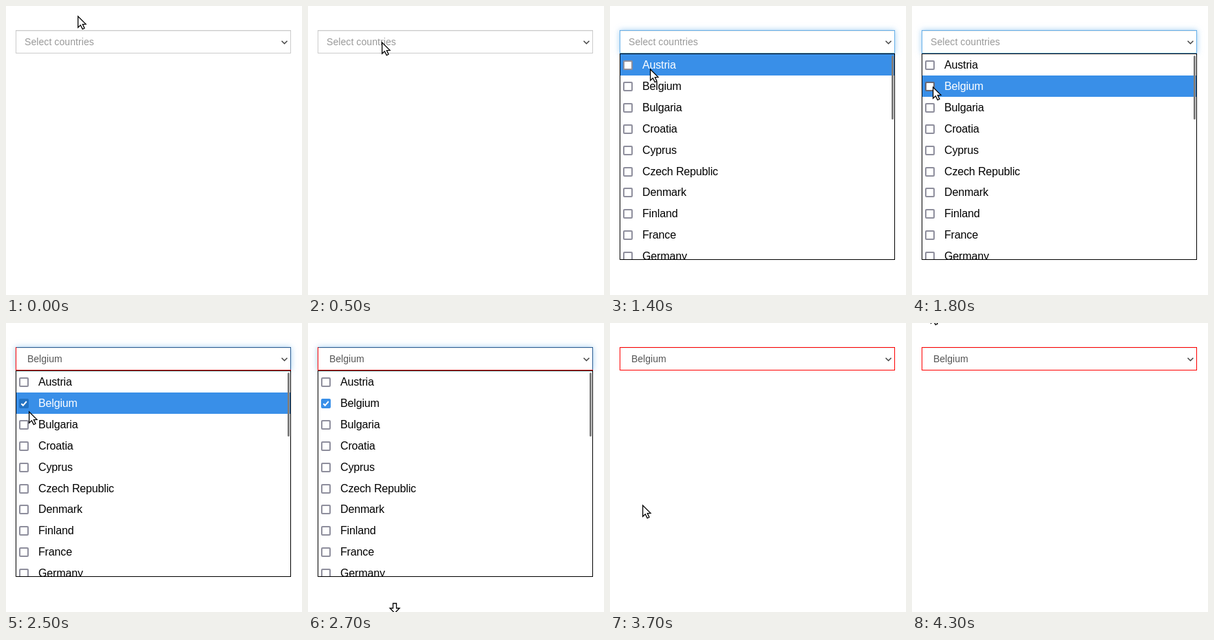
These frames come from a looping animation (430 px wide and 420 px high, 4700 ms). An HTML page with a canvas:

```html
<!DOCTYPE html>
<html lang="en">
<head>
<meta charset="utf-8">
<title>Country picker</title>
<style>
  html, body { margin: 0; width: 100%; height: 100%; overflow: hidden; background: #fff; }
  canvas { display: block; }
</style>
</head>
<body>
<canvas id="stage" width="430" height="420"></canvas>
<script>
const LOOP = 4700, STEP = 100;
const OPEN = 700, PICKED = 2000, LEAVE = 2700, CLOSE = 3100, BLUR = 3300;
const FONT = '"Liberation Sans", Arial, sans-serif';
const BLUE = '#398fe8', FOCUS = '#66afe9', RED = '#f00';
const LIST_TOP = 70.45, ROW = 30.82;

const countries = ['Austria', 'Belgium', 'Bulgaria', 'Croatia', 'Cyprus',
  'Czech Republic', 'Denmark', 'Finland', 'France', 'Germany'];
const PICK = countries.indexOf('Belgium');

const ctx = document.getElementById('stage').getContext('2d');

// Each move starts at a time and reaches its end after some steps;
// power 1 is linear, 3 accelerates.
const home = { x: 104, y: 14 };
const moves = [
  { at: 200, steps: 4, x: 107, y: 52 },
  { at: 1100, steps: 6, x: 34, y: 110 },
  { at: 1700, steps: 2, x: 30, y: 117 },
  { at: 2500, steps: 3, x: 118, y: 406, power: 3 },
  { at: 3000, steps: 1, x: 119, y: 395 },
  { at: 3600, steps: 3, x: -124, y: -47, power: 3 },
  { at: 4200, steps: 1, x: 27, y: -17 }
];

function pointerAt(t) {
  let { x, y } = home;
  for (const m of moves) {
    if (t < m.at) break;
    const p = Math.min(1, ((t - m.at) / STEP + 1) / m.steps) ** (m.power || 1);
    x += (m.x - x) * p;
    y += (m.y - y) * p;
  }
  return { x: Math.round(x), y: Math.round(y) };
}

function rect(x, y, w, h, color) {
  ctx.fillStyle = color;
  ctx.fillRect(x, y, w, h);
}

function roundBox(x, y, w, h, r, color) {
  ctx.beginPath();
  ctx.roundRect(x, y, w, h, r);
  ctx.fillStyle = color;
  ctx.fill();
}

function text(str, x, y, size, spacing, color) {
  ctx.font = `${size}px ${FONT}`;
  ctx.letterSpacing = `${spacing}px`;
  ctx.fillStyle = color;
  ctx.fillText(str, x, y);
}

function stroke(shape, color, width) {
  ctx.strokeStyle = color;
  ctx.lineWidth = width;
  ctx.stroke(shape);
}

function glowAt(t) {
  if (t < OPEN || t >= BLUR) return 0;
  if (t === OPEN) return 0.5;
  return t < BLUR - STEP ? 1 : 0.35;
}

// Colours of the top and right, then the left and bottom edges
function borderAt(t) {
  if (t < OPEN) return ['#ccc', '#ccc'];
  if (t <= PICKED) return [FOCUS, FOCUS];
  return t < BLUR ? ['#2b5d94', RED] : [RED, RED];
}

const chevron = new Path2D('M400.5 50.7l4 4 4-4');

function drawField(t) {
  ctx.save();
  ctx.shadowBlur = 8;
  ctx.shadowColor = `rgba(102,175,233,${0.6 * glowAt(t)})`;
  rect(14, 35, 400, 34, '#fff');
  ctx.restore();
  rect(15, 36, 398, 1, 'rgba(0,0,0,0.075)');

  const [upper, lower] = borderAt(t);
  rect(14, 35, 400, 1, upper);
  rect(413, 35, 1, 34, upper);
  rect(14, 35, 1, 34, lower);
  rect(14, 68, 400, 1, lower);

  if (t < PICKED) text('Select countries', 27, 57, 14, 0.08, '#999');
  else text(countries[PICK], 31, 57, 14, 0, '#555');
  stroke(chevron, '#444', 1.5);
}

const tick = new Path2D('M22.3 .2l2.5 2.6 5-5.8');

function drawCheck(y, checked, hover) {
  if (checked) {
    roundBox(19, y - 7, 14, 14, 2, hover ? '#2272c3' : BLUE);
    ctx.save();
    ctx.translate(0, y);
    stroke(tick, '#fff', 2);
    ctx.restore();
  } else {
    roundBox(19, y - 7, 14, 14, 2, hover ? '#676774' : '#8f8f9d');
    roundBox(21, y - 5, 10, 10, 0.5, '#fff');
  }
}

function drawList(t, pointer) {
  const active = t < LEAVE ? Math.max(0, Math.floor((pointer.y - LIST_TOP) / ROW)) : -1;
  rect(14, 69, 400, 300, '#000');
  rect(15, 70, 398, 298, '#fff');
  ctx.save();
  ctx.beginPath();
  ctx.rect(15, 70, 398, 298);
  ctx.clip();
  countries.forEach((name, i) => {
    const top = Math.round(LIST_TOP + i * ROW);
    const on = i === active;
    if (on) rect(15, top, 398, 31, BLUE);
    drawCheck(top + 16, i === PICK && t >= PICKED, on && pointer.x <= 33);
    text(name, 47, top + 21, 16, -0.15, on ? '#fff' : '#000');
  });
  roundBox(409, 72, 3, 93, 1.5, '#7f7f7f');
  ctx.restore();
}

const arrow = new Path2D('M.6 1v16.2l3.7-3.4 2.9 5.8 2.8-1.3-2.7-5.7 4.7-.2z');
const downArrow = new Path2D('M5.5 1.5h5v7h4.5l-7 7-7-7h4.5z');

function drawPointer(t, { x, y }) {
  const shape = t >= LEAVE && t < 3000 ? downArrow : arrow;
  ctx.save();
  ctx.translate(x, y);
  ctx.fillStyle = '#fff';
  ctx.fill(shape);
  stroke(shape, '#000', 1.3);
  ctx.restore();
}

function draw(t) {
  const pointer = pointerAt(t);
  rect(0, 0, 430, 420, '#fff');
  drawField(t);
  if (t >= OPEN && t < CLOSE) drawList(t, pointer);
  drawPointer(t, pointer);
}

const start = performance.now();
function frame() {
  const t = (performance.now() - start) % LOOP;
  draw(Math.floor(t / STEP) * STEP);
  requestAnimationFrame(frame);
}
frame();
</script>
</body>
</html>
```
